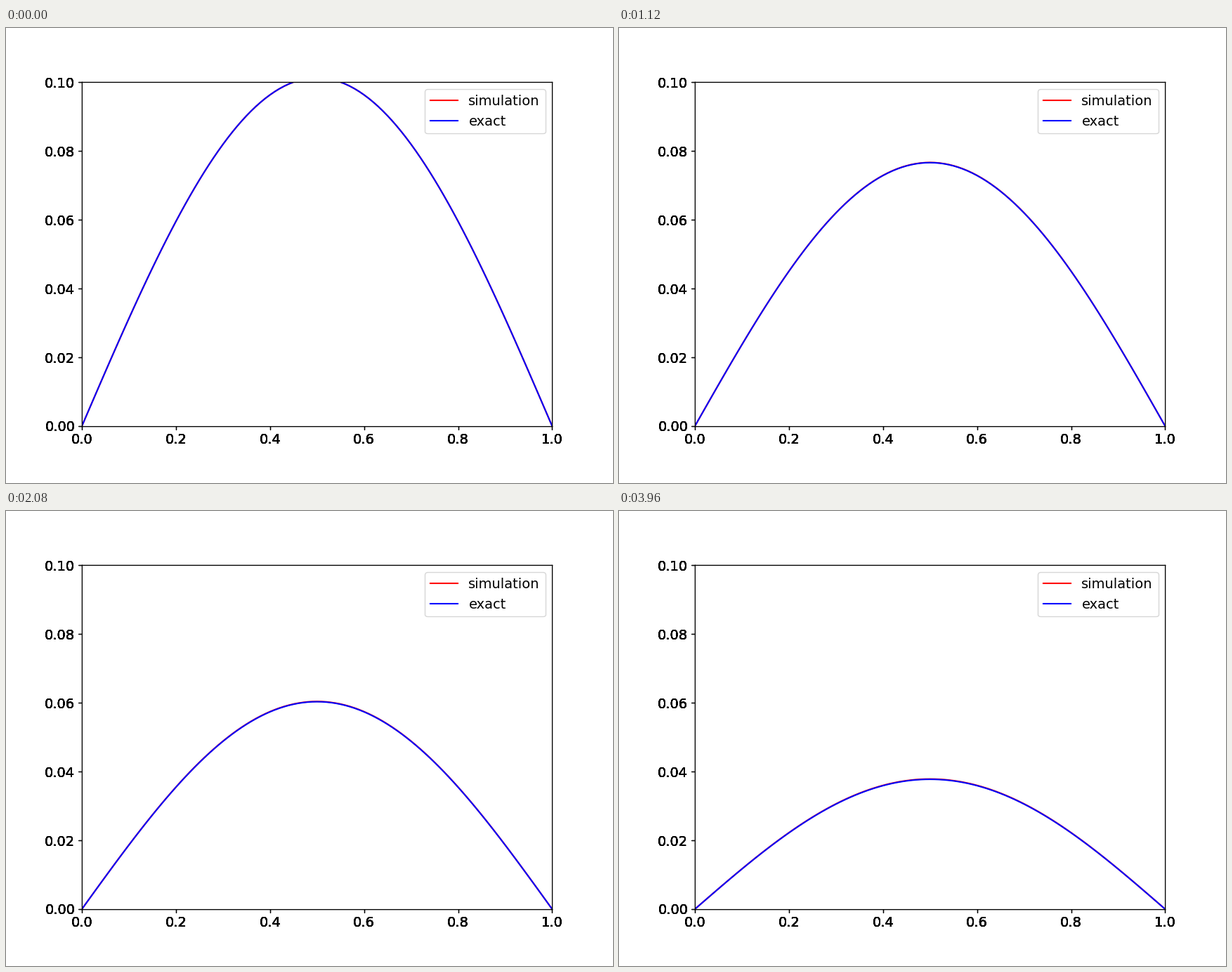
Write a matplotlib script that moves like this. It is 864x648 px and loops after 4 s.

```python
import numpy as np
import matplotlib.pyplot as plt
from matplotlib.animation import FuncAnimation

W, H, DPI = 864, 648, 100
FRAMES = 100
SUBSTEPS = 2
plt.rcParams.update({"font.family": "DejaVu Sans", "font.size": 14})

x = np.linspace(0, 1, 101)
dt = 0.1 / (FRAMES - 1)
start = np.sin(np.pi * x) / np.pi**2


def exact(n):
    return start * np.exp(-np.pi**2 * n * dt)


def implicit_euler(n):
    return start / (1 + np.pi**2 * dt / SUBSTEPS) ** (n * SUBSTEPS)


fig = plt.figure(figsize=(W / DPI, H / DPI), dpi=DPI, facecolor="white")


def add_axes():
    ax = fig.add_axes([108 / W, 81 / H, 669.4 / W, 489.6 / H])
    ax.set(xlim=(0, 1), ylim=(0, 0.1))
    return ax


# Stacked axes harden the edges of the tick labels and the frame.
for _ in range(6):
    ax = add_axes()
sim_line, = ax.plot([], [], "r", lw=1.5, label="simulation")
exact_line, = ax.plot([], [], "b", lw=1.5, label="exact")
ax.legend(loc="upper right")


def update(n):
    sim_line.set_data(x, implicit_euler(n))
    exact_line.set_data(x, exact(n))
    return sim_line, exact_line


anim = FuncAnimation(fig, update, frames=FRAMES, interval=40,
                     repeat=True, repeat_delay=0, blit=False)
plt.show()
```
